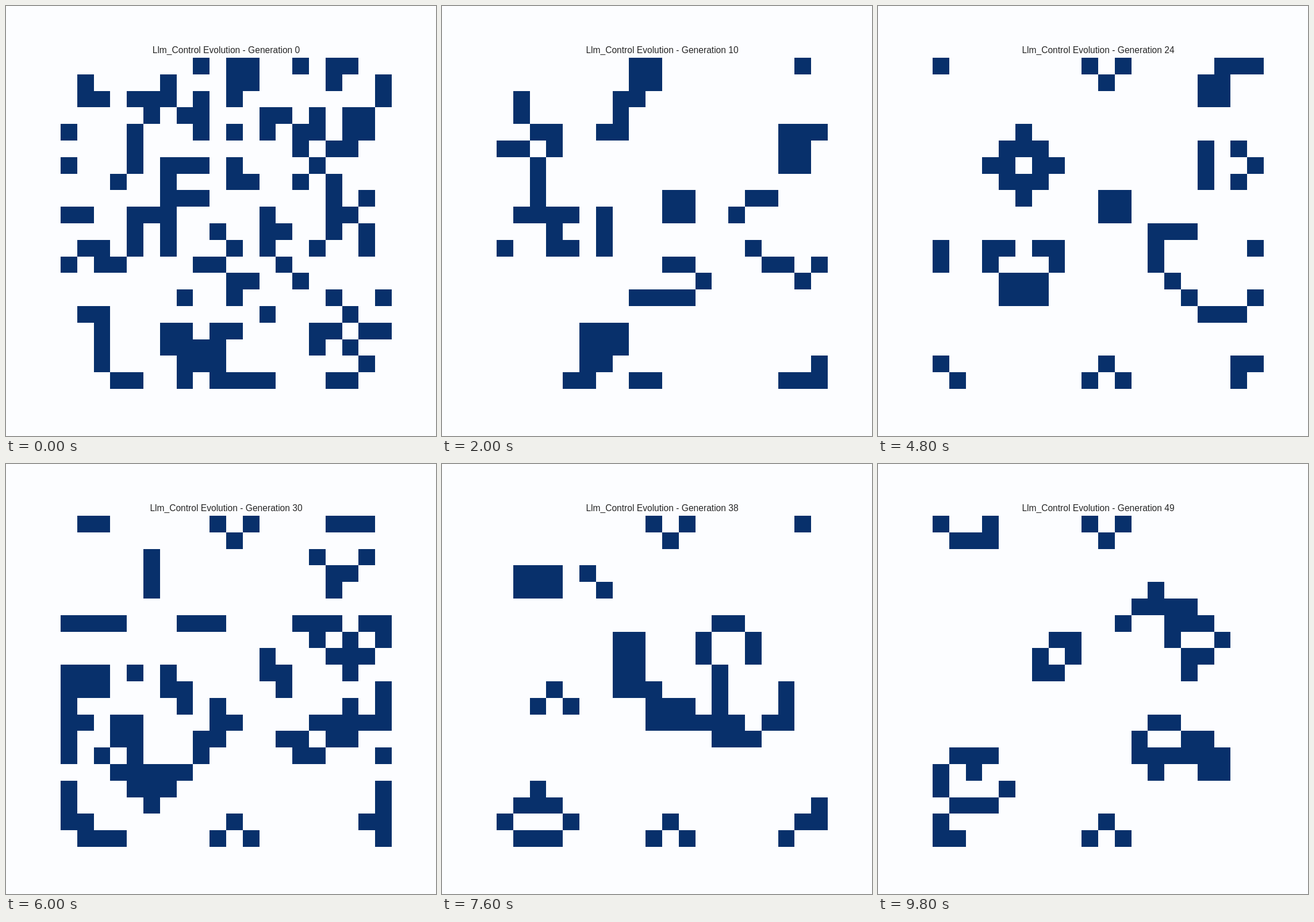
Animation, 748 px wide and 748 px high, one loop 10 s. Source, as an HTML page with a canvas:

```html
<!DOCTYPE html>
<html lang="en">
<head>
<meta charset="utf-8">
<title>Cellular evolution</title>
<style>
  html, body { margin: 0; width: 100%; height: 100%; overflow: hidden; background: #fcfdff; }
  canvas { display: block; }
</style>
</head>
<body>
<canvas id="stage" width="748" height="748"></canvas>
<script>
const SIZE = 20, CELL = 28.8, LEFT = 95, TOP = 90;
const GENERATIONS = 50, STEP_MS = 200;

const seed = [
  '........#.##..#.##..',
  '.#....#...##....#..#',
  '.##.###.#.#........#',
  '.....#.##...##.#.##.',
  '#...#...#.#.#.##.##.',
  '....#.........#.##..',
  '#...#.###.#....#....',
  '...#..#...##..#.#...',
  '......###.......#.#.',
  '##..###.....#...##..',
  '....#.#..#..##..#.#.',
  '.##.#.#...#.#..#..#.',
  '#.##....##...#......',
  '..........##..#.....',
  '.......#..#.....#..#',
  '.##.........#....#..',
  '..#...##.##....##.##',
  '..#...####.....#.#..',
  '..#....###........#.',
  '...##..#.####...##..',
].map(line => [...line].map(ch => ch === '#' ? 1 : 0));

const wrap = i => (i + SIZE) % SIZE;

// Conway's Game of Life on a torus.
function nextGeneration(grid) {
  return grid.map((line, r) => line.map((alive, c) => {
    let sum = -alive;
    for (let dr = -1; dr <= 1; dr++)
      for (let dc = -1; dc <= 1; dc++)
        sum += grid[wrap(r + dr)][wrap(c + dc)];
    return sum === 3 || (alive && sum === 2) ? 1 : 0;
  }));
}

const history = [seed];
while (history.length < GENERATIONS) history.push(nextGeneration(history.at(-1)));

const ctx = document.getElementById('stage').getContext('2d');
const edge = (origin, i) => Math.round(origin + i * CELL);

function draw(generation) {
  ctx.fillStyle = '#fcfdff';
  ctx.fillRect(0, 0, 748, 748);

  ctx.fillStyle = '#262626';
  ctx.font = '15.6px "Liberation Sans", Arial, sans-serif';
  ctx.textAlign = 'center';
  ctx.fillText(`Llm_Control Evolution - Generation ${generation}`, 383, 82);

  ctx.fillStyle = '#08306b';
  history[generation].forEach((line, r) => line.forEach((alive, c) => {
    if (!alive) return;
    const x = edge(LEFT, c), y = edge(TOP, r);
    ctx.fillRect(x, y, edge(LEFT, c + 1) - x, edge(TOP, r + 1) - y);
  }));
}

const start = performance.now();
function tick() {
  const elapsed = Math.max(0, performance.now() - start);
  draw(Math.floor(elapsed / STEP_MS) % GENERATIONS);
  requestAnimationFrame(tick);
}
tick();
</script>
</body>
</html>
```
